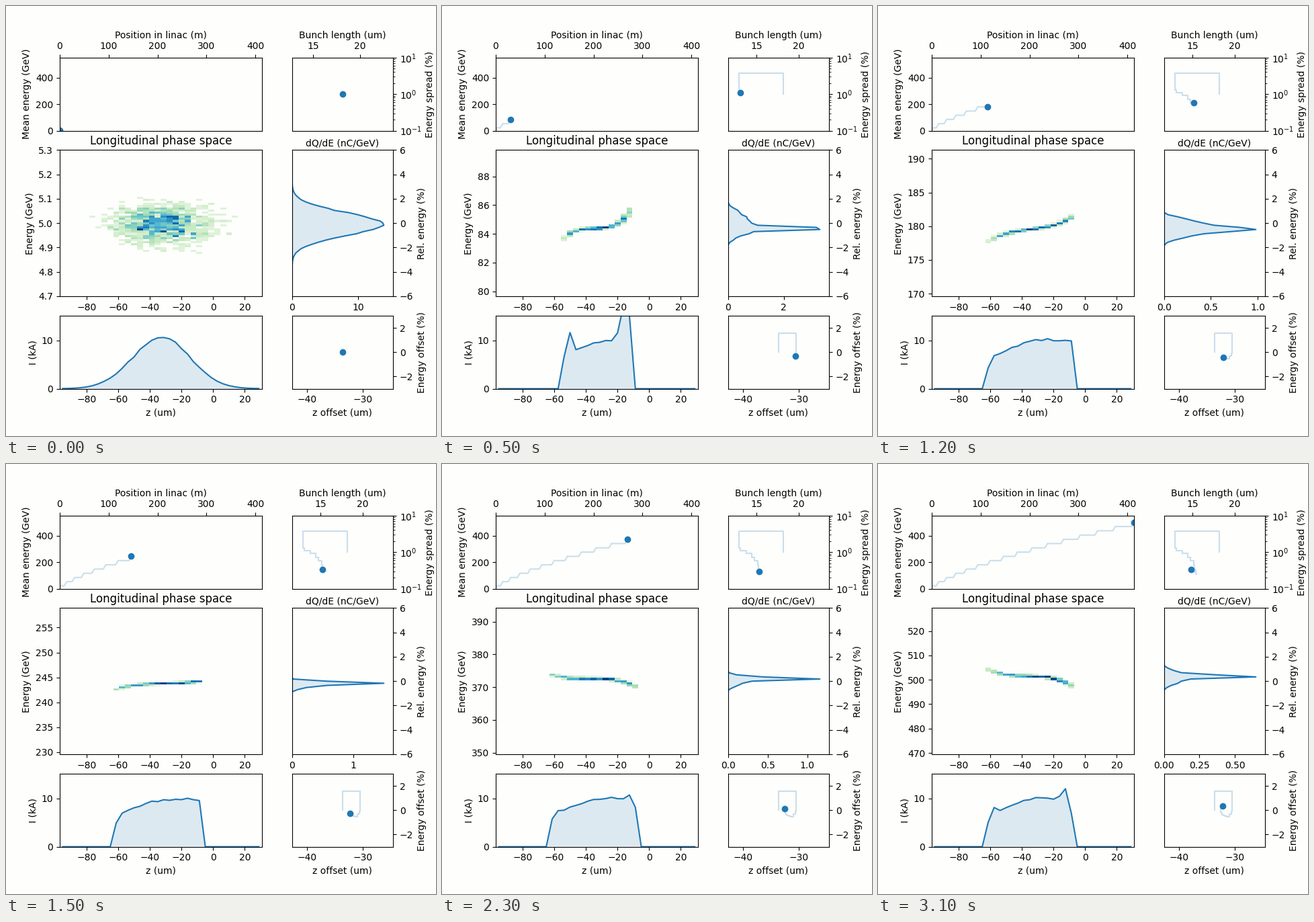
A matplotlib script that plays this animation: 640 by 640 pixels, repeating every 3200 ms.

```python
import numpy as np
import matplotlib.pyplot as plt
from matplotlib.animation import FuncAnimation

FRAMES = 32
BLUE = "#1f77b4"
PAPER = "#fefefc"

# Histogram grid of the bunch: columns along z, rows in relative energy (%)
COLS, ROWS = 34, 69
Z_MIN, Z_MAX = -97.06, 30.70
DZ = (Z_MAX - Z_MIN) / COLS
COL = np.arange(COLS)
Z = Z_MIN + DZ * (COL + 0.5)
ROW = np.arange(ROWS) - ROWS // 2
ROW_STEP = 12 / ROWS
DELTA = ROW * ROW_STEP
PARTICLES = 1800
LENGTH_0, Z_0 = 18.14, -33.64


def curve(xs, ys):
    return lambda x: np.interp(x, xs, ys)


# Energy side, a few key stages: mean and spread (%), spectrum height,
# and the bend of the bunch core in rows
STAGES = [0, 1, 2, 4, 6, 9, 12, 16]
offset = curve(STAGES, [0, 1.55, -0.1, -0.54, -0.45, -0.15, 0.12, 0.32])
log_spread = curve(STAGES, np.log([1, 3.74, 1.28, 0.92, 0.575, 0.249, 0.295, 0.334]))
height = curve(STAGES, [69.2, 18, 297, 262, 177, 458, 431, 324])
middle = curve(STAGES, [-0.5, 0, -1, -4.1, -3, -0.2, 1.2, 2.3])
tilt = curve(STAGES, [0, 0, 0, 0.8, 2.6, 0, -0.2, -0.4])
bow = curve(STAGES, [0, 0, 0, 0, 0, -1.1, -1, -0.5])
twist = curve(STAGES, [0, 0, 12, 11, 3, 0, -2.5, -3.4])

# z side, a few key transports: bunch length, edges of the current, front horn
MOVES = [1, 2, 4, 6, 9, 15]
squeezed = curve(MOVES, [12.87, 13.03, 14.42, 15.08, 15.44, 14.84])
tail = curve(MOVES, [10.67, 10.3, 9, 8.3, 8, 8.3])
head = curve(MOVES, [22.65, 23, 23.65, 24, 23.9, 23.65])
horn = curve(MOVES, [12, 8, 1.5, 0, 0, 2])


def nominal(stage):
    return 5 + 31.9 * max(stage - 0.5, 0)


def position(n):
    """Distance along the linac; transports grow with the root of energy."""
    stage, moved = (n + 1) // 2, n // 2
    plasma = max(5 * stage - 2.5, 0)
    return plasma + 1.51 * sum(nominal(k) ** 0.5 for k in range(1, moved + 1))


def z_offset(moved):
    """Each transport shifts the bunch in proportion to its energy offset."""
    return Z_0 + sum(9.35 * offset(k) / nominal(k) ** 0.5 for k in range(1, moved + 1))


def length(moved):
    return float(squeezed(moved)) if moved else LENGTH_0


def bell(x, width):
    return np.exp(-0.5 * (x / width) ** 2)


def current(moved):
    rough = 1 + 0.02 * np.random.default_rng(moved).standard_normal(COLS)
    if moved == 0:
        return 10.7 * bell(Z + 33, LENGTH_0) * rough
    lo, hi = tail(moved), head(moved)
    body = 10.1 - 4.5 * (1 - (COL - lo) / (0.75 * (hi - lo))) ** 2
    body += horn(moved) * (bell(COL - hi + 1.65, 0.7) + 0.7 * bell(COL - lo - 1.33, 0.6))
    return body * np.clip(COL - lo, 0, 1) * np.clip(hi - COL, 0, 1) * rough


def slices(stage, moved):
    """Energy distribution of every column, one column per slice."""
    if stage == 1:
        slope = float(np.exp(log_spread(1))) / length(moved)
        line = (offset(1) - slope * (Z - z_offset(moved))) / ROW_STEP
    else:
        u = np.clip((COL - 16) / 7, -1.2, 1.2)
        line = middle(stage) + tilt(stage) * u + bow(stage) * u**2 + twist(stage) * u**3
    core = 0.3 if stage else 5.4
    sigma = np.hypot(core, 0.45 * np.gradient(line))
    fine = ROW[:, None, None] + (np.arange(5) - 2) / 5
    return bell(fine - line[:, None], sigma[:, None]).mean(axis=2) / (sigma * np.sqrt(2 * np.pi))


def spectrum(stage):
    """dQ/dE on the energy rows."""
    moved = max(stage - 1, 0)
    rough = 1 + 0.03 * np.random.default_rng(stage).standard_normal(ROWS)
    shape = slices(stage, moved) @ current(moved) * rough
    return shape / shape.max() * height(stage) / nominal(stage)


def phase_space(n):
    amps = current(n // 2)
    density = slices((n + 1) // 2, n // 2) * amps / amps.sum()
    counts = np.random.default_rng(n).poisson(PARTICLES * density)
    return np.ma.masked_less_equal(counts, 0.1 * counts.max())


fig, axes = plt.subplots(3, 2, figsize=(6.4, 6.4), dpi=100, facecolor=PAPER,
                         gridspec_kw=dict(width_ratios=[2, 1], height_ratios=[1, 2, 1]))
(ax_e, ax_s), (ax_p, ax_q), (ax_i, ax_o) = axes
for ax in axes.flat:
    ax.set_facecolor(PAPER)
for ax in (ax_e, ax_s):
    ax.xaxis.tick_top()
    ax.xaxis.set_label_position("top")
for ax in (ax_s, ax_q, ax_o):
    ax.yaxis.tick_right()
    ax.yaxis.set_label_position("right")

steps = range(FRAMES)
place = np.array([position(n) for n in steps])
sizes = np.array([length(n // 2) for n in steps])
shifts = np.array([z_offset(n // 2) for n in steps])
stages = np.array([(n + 1) // 2 for n in steps])
spreads, offsets = np.exp(log_spread(stages)), offset(stages)
energy = np.array([nominal(k) for k in stages]) * (1 + offsets / 100)
paths = [(place, energy), (sizes, spreads), (shifts, offsets)]

ax_e.set(xlabel="Position in linac (m)", ylabel="Mean energy (GeV)",
         xlim=(0, place[-1]), ylim=(0, 1.1 * energy[-1]))
ax_s.set(xlabel="Bunch length (um)", ylabel="Energy spread (%)",
         yscale="log", ylim=(0.1, 10))
ax_p.set_title("Longitudinal phase space")
ax_p.set(ylabel="Energy (GeV)", xlim=(Z_MIN, Z_MAX))
ax_q.xaxis.set_label_position("top")
ax_q.set(xlabel="dQ/dE (nC/GeV)", ylabel="Rel. energy (%)",
         ylim=(-6, 6), yticks=range(-6, 7, 2))
ax_i.set(xlabel="z (um)", ylabel="I (kA)", xlim=(Z_MIN, Z_MAX), ylim=(0, 15.1))
ax_o.set(xlabel="z offset (um)", ylabel="Energy offset (%)",
         xlim=(Z_0 - LENGTH_0 / 2, Z_0 + LENGTH_0 / 2), ylim=(-3, 3))


def trail(ax):
    line, = ax.plot([], [], color=BLUE, alpha=0.23)
    dot, = ax.plot([], [], "o", color=BLUE)
    return line, dot


def filled(ax):
    area, = ax.fill([0, 0, 0], [0, 0, 0], color=BLUE, alpha=0.15, lw=0)
    line, = ax.plot([], [], color=BLUE)
    return area, line


def set_filled(parts, x, y, base):
    """Update a curve and its area; base is the pair of closing points."""
    area, line = parts
    line.set_data(x, y)
    area.set_xy(np.vstack([base[0], np.column_stack([x, y]), base[1]]))


trails = [trail(ax) for ax in (ax_e, ax_s, ax_o)]
charge, amperes = filled(ax_q), filled(ax_i)
mesh = ax_p.pcolormesh(np.linspace(0, 1, COLS + 1), np.linspace(0, 1, ROWS + 1),
                       np.zeros((ROWS, COLS)), cmap="GnBu", transform=ax_p.transAxes)
ax_p.set_xlim(Z_MIN, Z_MAX)


def draw(n):
    for (line, dot), (x, y) in zip(trails, paths):
        line.set_data(x[:n + 1], y[:n + 1])
        dot.set_data(x[n:n + 1], y[n:n + 1])
    ax_s.set_xlim(min(0.7 * LENGTH_0, 0.9 * sizes[:n + 1].min()), 1.3 * LENGTH_0)

    stage, moved = (n + 1) // 2, n // 2
    mid = nominal(stage)
    ax_p.set_ylim(0.94 * mid, 1.06 * mid)
    counts = phase_space(n)
    mesh.set_array(counts)
    mesh.set_clim(0, counts.max())

    dq = spectrum(stage)
    set_filled(charge, dq, DELTA, [(0, DELTA[0]), (0, DELTA[-1])])
    ax_q.set_xlim(0, 1.1 * dq.max())
    set_filled(amperes, Z, current(moved), [(Z[0], 0), (Z[-1], 0)])
    return []


anim = FuncAnimation(fig, draw, frames=FRAMES, interval=100, repeat=True,
                     repeat_delay=0, init_func=lambda: draw(0), blit=False)
plt.show()
```
